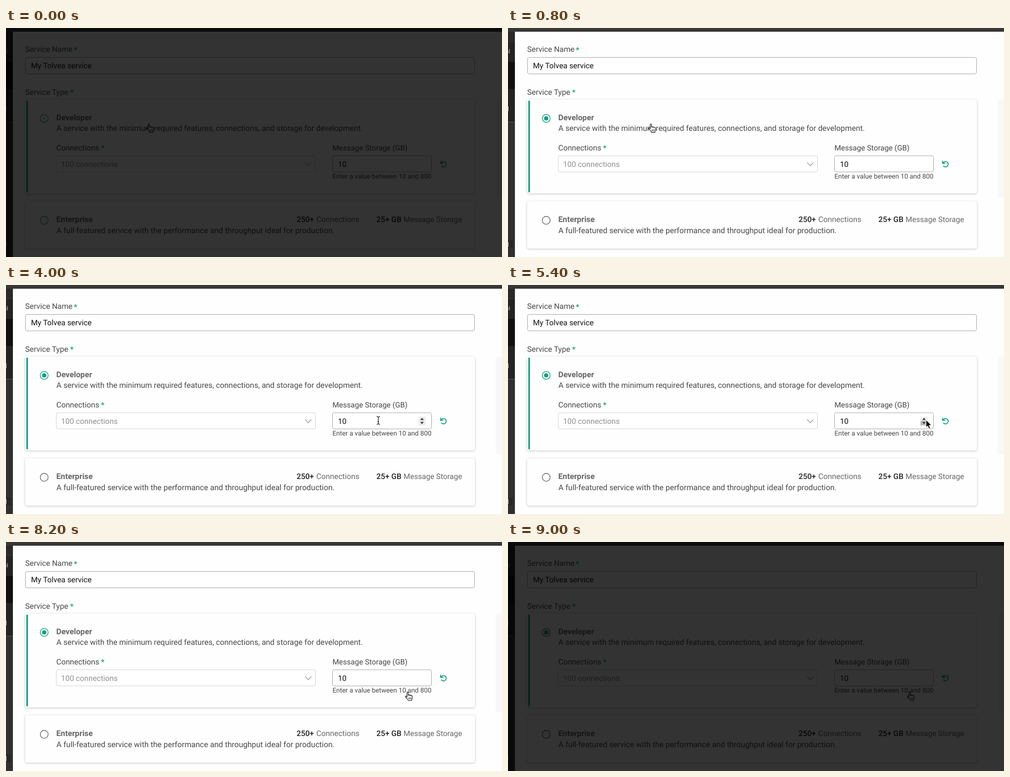
An HTML page for the animation above (9.2 s loop, 932 by 432 pixels).

```html
<!DOCTYPE html>
<html lang="en">
<head>
<meta charset="utf-8">
<title>Service form</title>
<style>
  html, body { margin: 0; width: 100%; height: 100%; overflow: hidden; background: #000; }
  svg { display: block; width: 932px; height: 432px; }
  text { font: 14.45px Roboto, "Open Sans", sans-serif; fill: #474747; text-rendering: geometricPrecision; white-space: pre; }
  .title { font-weight: 600; font-size: 14.85px; fill: #666; }
  .value { fill: #111; font-size: 14.4px; }
  .strong { fill: #222; font-weight: 500; }
  .soft { fill: #666; font-size: 14.2px; }
  .ghost { fill: #8f8f8f; font-size: 14.4px; }
  .hint { font-size: 12.45px; }
  .star { fill: #0fa383; font-weight: 600; font-size: 14px; }
  .side { fill: #b9b7b5; font-size: 11px; }
  .field { fill: #fff; stroke: #aaa; }
  .card { fill: #fefefe; filter: drop-shadow(0 1px 2px rgba(0, 0, 0, .22)); }
  .line { fill: none; stroke-linecap: round; stroke-linejoin: round; }
  .ring { fill: #fff; }
  .cursor { stroke-linejoin: round; display: none; }
</style>
</head>
<body>
<svg viewBox="0 0 932 432">
  <rect width="932" height="432" fill="#393735"/>
  <rect y="7" width="13" height="18" fill="#2c2a29"/>
  <rect y="26" width="13" height="38" fill="#262423"/>
  <rect y="64" width="13" height="51" fill="#121110"/>
  <rect y="115" width="13" height="62" fill="#262423"/>
  <rect y="177" width="13" height="1" fill="#5c5a58"/>
  <rect y="178" width="13" height="254" fill="#31302f"/>
  <rect y="401" width="9" height="14" fill="#292726"/>
  <text class="side" x="-5" y="48">ol</text>
  <rect y="148" width="1" height="9" fill="#b9b7b5"/>
  <rect y="404" width="1" height="9" fill="#b9b7b5"/>
  <rect x="13" y="7" width="919" height="425" fill="#fefefe"/>
  <rect x="920" y="135" width="20" height="185" rx="4" fill="#f8f8fb"/>

  <text x="36" y="45.3">Service Name</text>
  <text class="star" x="127.6" y="45.6">*</text>
  <rect class="field" x="36.5" y="55.5" width="844" height="31" rx="3.5"/>
  <text class="value" x="47" y="76.4">My Tolvea service</text>

  <text x="36" y="125.5">Service Type</text>
  <text class="star" x="120.6" y="125.8">*</text>

  <rect class="card" x="36" y="135" width="845" height="177" rx="4"/>
  <rect x="38.2" y="137" width="3" height="173" rx="1" fill="#0aa081"/>
  <circle class="ring" id="devRing" cx="71.8" cy="170.5" r="7.4" stroke="#0a9c7c"/>
  <circle id="devDot" cx="71.8" cy="170.5" r="4" fill="#0aa081"/>
  <text class="title" x="94.5" y="174">Developer</text>
  <text x="94.8" y="194.3" style="font-size:14.57px">A service with the minimum required features, connections, and storage for development.</text>

  <text x="94.5" y="231.2">Connections</text>
  <text class="star" x="178.6" y="231.4">*</text>
  <rect class="field" x="94.5" y="241" width="487" height="30.5" rx="3.5" style="stroke:#d4d4d4"/>
  <text class="ghost" x="103.5" y="261.7">100 connections</text>
  <path class="line" d="M562.5 254 568 260 573.5 254" stroke="#a3a3a3" stroke-width="1.4"/>

  <text x="613.5" y="231.2" style="font-size:14.1px">Message Storage (GB)</text>
  <rect class="field" x="613.5" y="241" width="186" height="30.5" rx="3.5"/>
  <text class="value" x="623.7" y="261.7">10</text>
  <g id="spin">
    <rect x="775" y="248.5" width="13.5" height="16.5" rx="1" fill="#ededed"/>
    <rect id="press" x="775" y="256.5" width="13.5" height="8.5" fill="#bdbdbd"/>
    <path d="M778.3 254.8 781.7 250.5 785.1 254.8ZM778.3 258.2H785.1L781.7 262.5Z" fill="#3c3c3c"/>
  </g>
  <text class="hint" x="613.5" y="284.3">Enter a value between 10 and 800</text>
  <path class="line" d="M817.8 254.6A5 5 0 1 1 818.3 260.2M816.6 251V255.3H821" stroke="#0aa081" stroke-width="1.7"/>

  <rect class="card" x="36" y="327" width="845" height="89" rx="4"/>
  <circle class="ring" id="entRing" cx="71.8" cy="362.8" r="7.4" stroke-width="1.1"/>
  <text class="title" x="94.5" y="366">Enterprise</text>
  <text x="94.8" y="386.5" style="font-size:14.66px">A full-featured service with the performance and throughput ideal for production.</text>
  <text class="strong" x="546" y="366">250+</text>
  <text class="soft" x="583" y="366" style="font-size:14.5px">Connections</text>
  <text class="strong" x="696" y="366">25+ GB</text>
  <text class="soft" x="747" y="366">Message Storage</text>

  <g class="cursor" id="hand">
    <path d="M4 10V2C4 .2 6.4 .2 6.4 2V7C6.7 5.6 8.8 5.7 8.9 7.2 9.2 6.1 11.2 6.3 11.4 7.7 11.8 6.8 13.8 7 13.8 8.7V12C13.8 14 12.8 14.6 12.7 16.6H6.4C6.2 14.6 3.2 12.6 1.2 9.9 .4 8.5 2.3 7.6 4 9.6Z" fill="#fff" stroke="#111" stroke-width="1.1"/>
    <path d="M7.4 11V14M9.3 11V14M11.2 11V14" stroke="#111" stroke-width=".9"/>
  </g>
  <path class="cursor" id="beam" d="M-3.3-7.5Q0-7.5 0-5 0-7.5 3.3-7.5M0-5V5M-3.3 7.5Q0 7.5 0 5 0 7.5 3.3 7.5M-1.5 2.5H1.5" fill="none" stroke="#111" stroke-width="1.1"/>
  <path class="cursor" id="arrow" d="M0 0V14.2L3.2 11.2 5.4 16.4 8 15.3 5.8 10.3H10.3Z" fill="#000" stroke="#fff" stroke-width="1"/>

  <rect id="shade" width="932" height="432" fill="#000"/>
</svg>
<script>
  const LOOP = 9200, TICK = 200;
  const $ = id => document.getElementById(id);
  const set = (id, attrs) => { for (const k in attrs) $(id).setAttribute(k, attrs[k]); };
  const clamp = v => Math.max(0, Math.min(1, v));

  // time, x, y, pointer shape
  const path = [
    [0, 263.3, 180.3, "hand"],
    [1600, 263.3, 180.3, "hand"],
    [1800, 296, 194, "hand"],
    [2000, 296, 194, "hand"],
    [2400, 570, 240, "hand"],
    [2600, 636.2, 253.8, "beam"],
    [3200, 648, 255, "beam"],
    [3600, 654, 255, "beam"],
    [3800, 654, 255, "beam"],
    [4200, 745, 256, "beam"],
    [4400, 780, 252, "arrow"],
    [5400, 785.5, 254.5, "arrow"],
    [6200, 785.5, 254.5, "arrow"],
    [6600, 819, 258, "hand"],
    [7800, 819, 258, "hand"],
    [8000, 749.5, 282.4, "hand"],
    [LOOP, 749.5, 282.4, "hand"]
  ];

  function pointer(t) {
    const i = path.findIndex((p, n) => n + 1 === path.length || path[n + 1][0] > t);
    const a = path[i], b = path[i + 1] || a;
    const k = b === a ? 0 : (t - a[0]) / (b[0] - a[0]);
    return { x: a[1] + (b[1] - a[1]) * k, y: a[2] + (b[2] - a[2]) * k, kind: a[3] };
  }

  function draw(now) {
    const t = Math.floor((now % LOOP) / TICK) * TICK;
    const light = Math.min(clamp((t + 200) / 1000), clamp((LOOP - t) / 1000));
    set("shade", { opacity: 1 - light });

    const settled = t >= 600;
    set("devDot", { r: settled ? 4 : 1.9, opacity: settled ? 1 : .5 });
    set("devRing", { "stroke-width": settled ? 1.3 : 1.1 });
    set("entRing", { stroke: settled ? "#555" : "#1f8a70" });

    set("spin", { opacity: t >= 2600 && t < 6400 ? 1 : 0 });
    set("press", { opacity: t >= 5200 && t < 6400 ? 1 : 0 });

    const p = pointer(t);
    for (const id of ["hand", "beam", "arrow"]) $(id).style.display = id === p.kind ? "inline" : "none";
    set(p.kind, { transform: `translate(${p.x} ${p.y})` });
  }

  const start = performance.now();
  function loop() {
    draw(performance.now() - start);
    requestAnimationFrame(loop);
  }
  loop();
</script>
</body>
</html>
```
